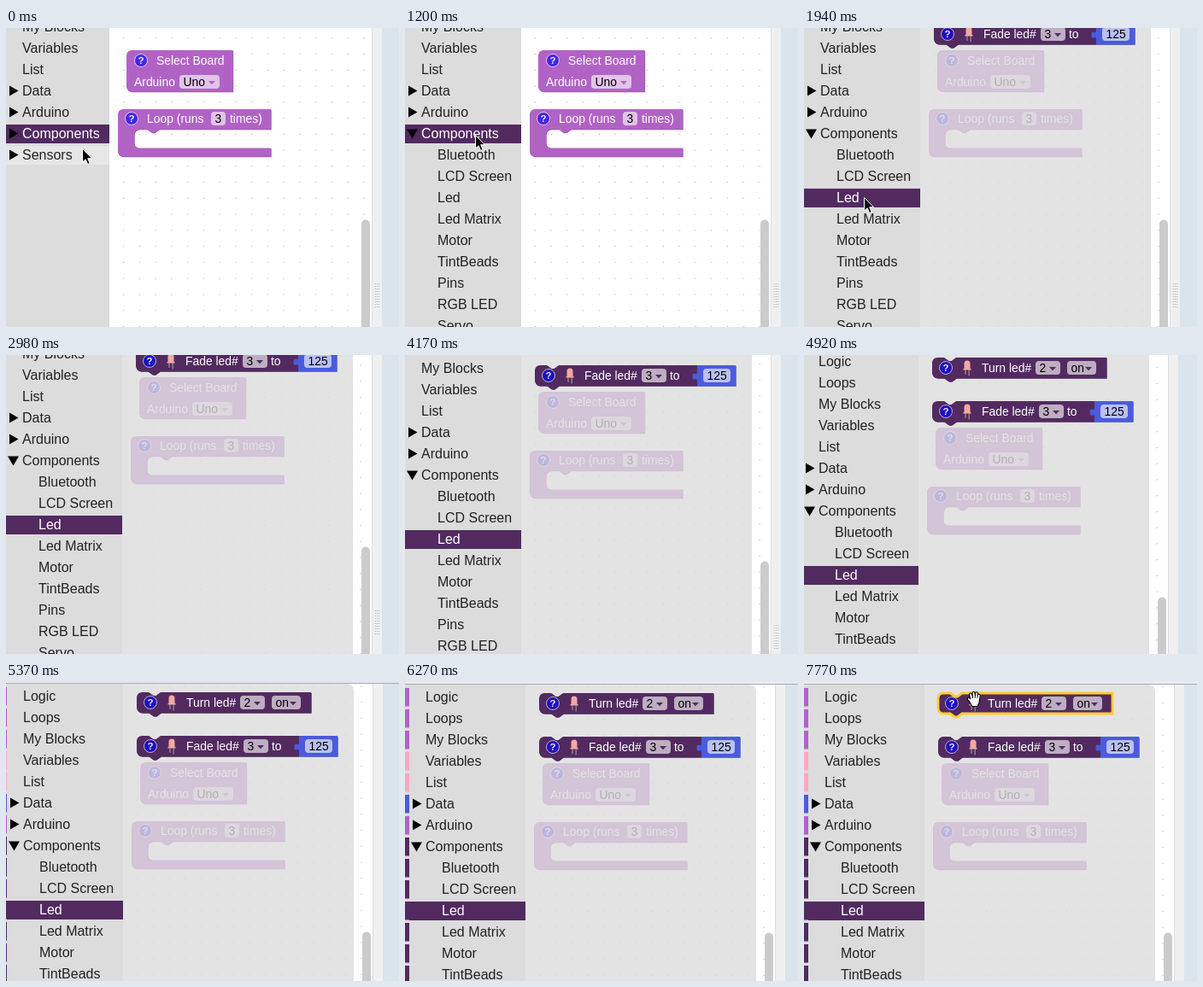
Animation, 460 px wide and 350 px high, one loop 8 s. Source, as an HTML page:

```html
<!DOCTYPE html>
<html lang="en">
<head>
<meta charset="utf-8">
<title>Block editor</title>
<style>
  html, body { margin: 0; width: 100%; height: 100%; overflow: hidden; background: #fff; }
  svg { display: block; width: 460px; height: 350px; }
  text { font-family: "Liberation Sans", Arial, sans-serif; font-size: 13.9px; white-space: pre; }
  .row text { font-size: 16px; fill: #222; }
  .row.on text { fill: #fff; }
  .row .bg { fill: none; }
  .row.hover .bg { fill: #e6e6e6; }
  .row.on .bg { fill: #522a60; }
</style>
</head>
<body>
<svg id="stage" viewBox="0 0 460 350" xmlns="http://www.w3.org/2000/svg"></svg>
<script>
const LOOP = 8000;
const STEPS = [0, 450, 600, 750, 1200, 1350, 1500, 1640, 1790, 1940, 2540, 2690, 2830, 2980,
  3870, 4020, 4170, 4320, 4470, 4620, 4770, 4920, 5070, 5220, 5370,
  5820, 5970, 6120, 6270, 7170, 7320, 7620, 7770];
const EXPAND = 750, OPEN = 1940;

// time, x, y
const CAMERA = [[0, 0, 0], [2980, 0, 0], [3870, 0, 4], [4170, 0, 17], [4770, -1, 51], [4920, -2, 59],
  [5370, 1, 68], [5820, 2, 68], [6270, 5, 69], [LOOP, 5, 69]];
const ARROW = [[0, 89, 141], [450, 86, 133], [600, 82, 124], [1200, 82, 125], [1350, 81, 136],
  [1500, 77, 164], [1640, 72, 190], [1790, 70, 198], [1940, 70, 198], [2540, 98, 178],
  [2690, 215, 105], [2830, 333, 24], [7170, 197, 4], [7320, 197, 7], [LOOP, 197, 7]];
const HAND = [[0, 1, -1], [7620, 1, -1], [7770, 0, 0], [LOOP, 0, 0]];

const PURPLE = "#b163c5", DARK = "#522a60", BLUE = "#4a5bdc", PINK = "#ffa6c1";

// label, bar colour, kind: "" plain, ">" group, "-" child
const ROWS = [
  ["Logic", PURPLE, ""], ["Loops", PURPLE, ""], ["My Blocks", PURPLE, ""],
  ["Variables", PINK, ""], ["List", PINK, ""], ["Data", BLUE, ">"],
  ["Arduino", PURPLE, ">"], ["Components", DARK, ">"],
  ["Bluetooth", DARK, "-"], ["LCD Screen", DARK, "-"], ["Led", DARK, "-"],
  ["Led Matrix", DARK, "-"], ["Motor", DARK, "-"], ["TintBeads", DARK, "-"],
  ["Pins", DARK, "-"], ["RGB LED", DARK, "-"], ["Servo", DARK, "-"]
];
const COMPONENTS = 7, LED = 10, SENSORS = ROWS.length;
const rowY = i => 24 + (i - 3) * 25;

const label = (x, y, s, fill = "#fff") => `<text x="${x}" y="${y}" fill="${fill}">${s}</text>`;
const box = (x, y, w, h, fill, extra = "") =>
  `<rect x="${x}" y="${y}" width="${w}" height="${h}" fill="${fill}" ${extra}/>`;

function row([name, color, kind], i, y) {
  const mark = kind === ">" ? `<path class="tri" d="M4 ${y - 6.5}l10.5 6-10.5 6z"/>` : "";
  return `<g class="row" id="row${i}">${box(-8, y - 11, 8, 21.5, color)}
    <rect class="bg" x="0" y="${y - 11}" width="136" height="22"/>${mark}
    <text x="${kind === "-" ? 38 : 19}" y="${y + 5.3}">${name}</text></g>`;
}

function field(x, y, w, s, color, menu) {
  const arrow = menu ? `<path d="M${x + w - 13} ${y + 7}h8l-4 4.2z" fill="${color}"/>` : "";
  return box(x, y, w, 16, "#fff", 'rx="4" opacity=".62"') + label(x + 4.5, y + 13, s, "#000") + arrow;
}

const help = (x, y) => `<circle cx="${x}" cy="${y}" r="7.5" fill="#00f" stroke="#fff" opacity=".62"/>
  <text x="${x}" y="${y + 4}" text-anchor="middle" fill="#fff" opacity=".9"
    style="font-size:11.5px;font-weight:bold">?</text>`;

const bulb = (x, y) => `<path d="M${x - 2} ${y + 8}v8M${x + 2.2} ${y + 8}v9.5" stroke="#8b7f8c" stroke-width="1.5"/>
  <path d="M${x - 3.5} ${y + 9}v-6a3.5 3.5 0 0 1 7 0v6h1v1.5h-9v-1.5z" fill="#f3a9a2"/>`;

const body = (d, color, shade) =>
  `<path d="${d}" fill="${shade}" transform="translate(.7 .7)"/><path d="${d}" fill="${color}"/>`;

// statement block with a notch on top and a tail below
const stack = (x, y, w) => `M${x} ${y + 6}a6 6 0 0 1 6-6h8l5.5 4h3l5.5-4H${x + w}v24H${x + 28}
  l-5.5 4h-3l-5.5-4h-8a6 6 0 0 1-6-6z`;

const TURN = stack(152, -56, 204);

const boardBlock = body("M156 32a6 6 0 0 1 6-6H280.5V74.5H162a6 6 0 0 1-6-6z", PURPLE, "#9653a8") +
  help(173, 38) + label(191, 43, "Select Board") + label(165, 68, "Arduino") +
  field(218, 55, 47, "Uno", PURPLE, true);

const loopBlock = body(`M146 101a6 6 0 0 1 6-6H325V118.5H194l-5.5 4h-3l-5.5-4h-9a6 6 0 0 0-6 6v10
  a6 6 0 0 0 6 6H325V150.500H152a6 6 0 0 1-6-6z`, PURPLE, "#9653a8") +
  help(162, 106) + label(180, 111, "Loop (runs") + field(255, 98, 17, "3", PURPLE) +
  label(277, 111, "times)");

const turnBlock = body(TURN, DARK, "#42224d") + help(168, -44) + bulb(193, -52) +
  label(210, -39, "Turn led#") + field(273, -52, 29, "2", DARK, true) +
  field(310, -52, 34, "on", DARK, true) +
  `<path id="glow" d="${TURN}" fill="none" stroke="#fc3" stroke-width="2.8"/>`;

const fadeBlock = body(stack(152, -5, 190), DARK, "#42224d") + help(168, 7) + bulb(193, -1) +
  label(210, 12, "Fade led#") + field(277, -1, 29, "3", DARK, true) + label(310, 12, "to") +
  body("M342-5h45v24h-45v-5c0-8-5.500 2-5.500-6s5.500 2 5.500-6z", BLUE, "#3c4ab4") +
  field(349, -1, 32, "125", BLUE);

const fingers = `<path d="M196.500 20.500L195 14.500M199 19.500L198.500 13M201.500 19.500L202 13.300M204 20.500L204.700 15.800M196 23L192.800 19.800"/>
  <path d="M196 20h8l-.5 4-1.500 3h-4.500l-2-4z"/>`;

document.getElementById("stage").innerHTML = `
  <defs><pattern id="dots" x="405.600" y="2.600" width="18.75" height="18.75" patternUnits="userSpaceOnUse">
    <circle cx="9.400" cy="9.400" r=".8" fill="#c4c4c4"/></pattern></defs>
  <g id="cam">
    <g id="space">${box(90, -66, 400, 520, "url(#dots)")}${boardBlock}${loopBlock}</g>
    <g id="flyout">
      <path d="M136-66H398a8 8 0 0 1 8 8V450H136z" fill="#ddd" opacity=".8"/>
      ${turnBlock}${fadeBlock}
    </g>
    ${box(416, 224.500, 10, 240, "#cbcbcb", 'rx="5"')}
    ${box(428, -70, 12, 520, "#efefef")}${box(428, -70, 1, 520, "#dedede")}
    ${box(440, -70, 60, 520, "#dae4ec")}
    <path d="M432.500 299v30M434.500 299v30M436.500 299v30" stroke="#b4b4b4" stroke-dasharray="1 2"/>
    <rect id="side" x="-20" y="-66" width="136" height="520" fill="#dcdcdc"/>
    ${ROWS.map((r, i) => row(r, i, rowY(i))).join("")}
    ${row(["Sensors", DARK, ">"], SENSORS, rowY(8))}
    ${box(-20, -80, 520, 13, "#ececf0")}${box(-20, -67, 520, 1, "#a9a9ad")}
  </g>
  <path id="arrow" d="M0 0V15.500L3.600 12.200 6.200 18 8.700 16.900 6.200 11.200H11z"
    fill="#000" stroke="#fff" stroke-width="1" stroke-linejoin="round"/>
  <g id="hand" stroke-linecap="round" stroke-linejoin="round">
    <g stroke="#000" stroke-width="4" fill="#000">${fingers}</g>
    <g stroke="#fff" stroke-width="1.900" fill="#fff">${fingers}</g>
  </g>`;

const $ = id => document.getElementById(id);
const show = (el, on) => el.setAttribute("display", on ? "inline" : "none");
const move = (el, [x, y]) => el.setAttribute("transform", `translate(${x} ${y})`);

function along(keys, t) {
  let i = 0;
  while (i < keys.length - 2 && keys[i + 1][0] <= t) i++;
  const [a, b] = [keys[i], keys[i + 1]];
  const k = (t - a[0]) / (b[0] - a[0]);
  return [1, 2].map(n => a[n] + (b[n] - a[n]) * k);
}

function draw(now) {
  const t = STEPS.filter(s => s <= now).pop();
  const wide = t >= EXPAND, open = t >= OPEN, grab = t >= 7620;
  const arrowOn = t < 2980 || (t >= 7170 && !grab);
  const tip = along(ARROW, t).map(Math.round);
  const width = wide ? 136 : 121;

  move($("cam"), along(CAMERA, t).map(Math.round));
  move($("space"), [wide ? 0 : -15, 0]);
  $("side").setAttribute("width", width + 20);
  show($("flyout"), open);
  show($("glow"), grab);

  for (let i = 0; i <= SENSORS; i++) {
    const el = $("row" + i), y = rowY(i === SENSORS ? 8 : i);
    const over = t < 2980 && tip[0] < width && Math.abs(tip[1] - y) <= 11;
    show(el, i < 8 || (i === SENSORS) !== wide);
    el.classList.toggle("on", i === (open ? LED : COMPONENTS));
    el.classList.toggle("hover", over);
    el.querySelector(".bg").setAttribute("width", width);
  }
  const y = rowY(COMPONENTS);
  $("row" + COMPONENTS).querySelector(".tri")
    .setAttribute("d", wide ? `M2 ${y - 5.5}h13l-6.500 11z` : `M4 ${y - 6.5}l10.500 6-10.500 6z`);

  show($("arrow"), arrowOn);
  move($("arrow"), [tip[0] + .5, tip[1] + .5]);
  show($("hand"), grab);
  move($("hand"), along(HAND, t));
}

const start = performance.now();
function tick() {
  draw((performance.now() - start) % LOOP);
  requestAnimationFrame(tick);
}
tick();
</script>
</body>
</html>
```
